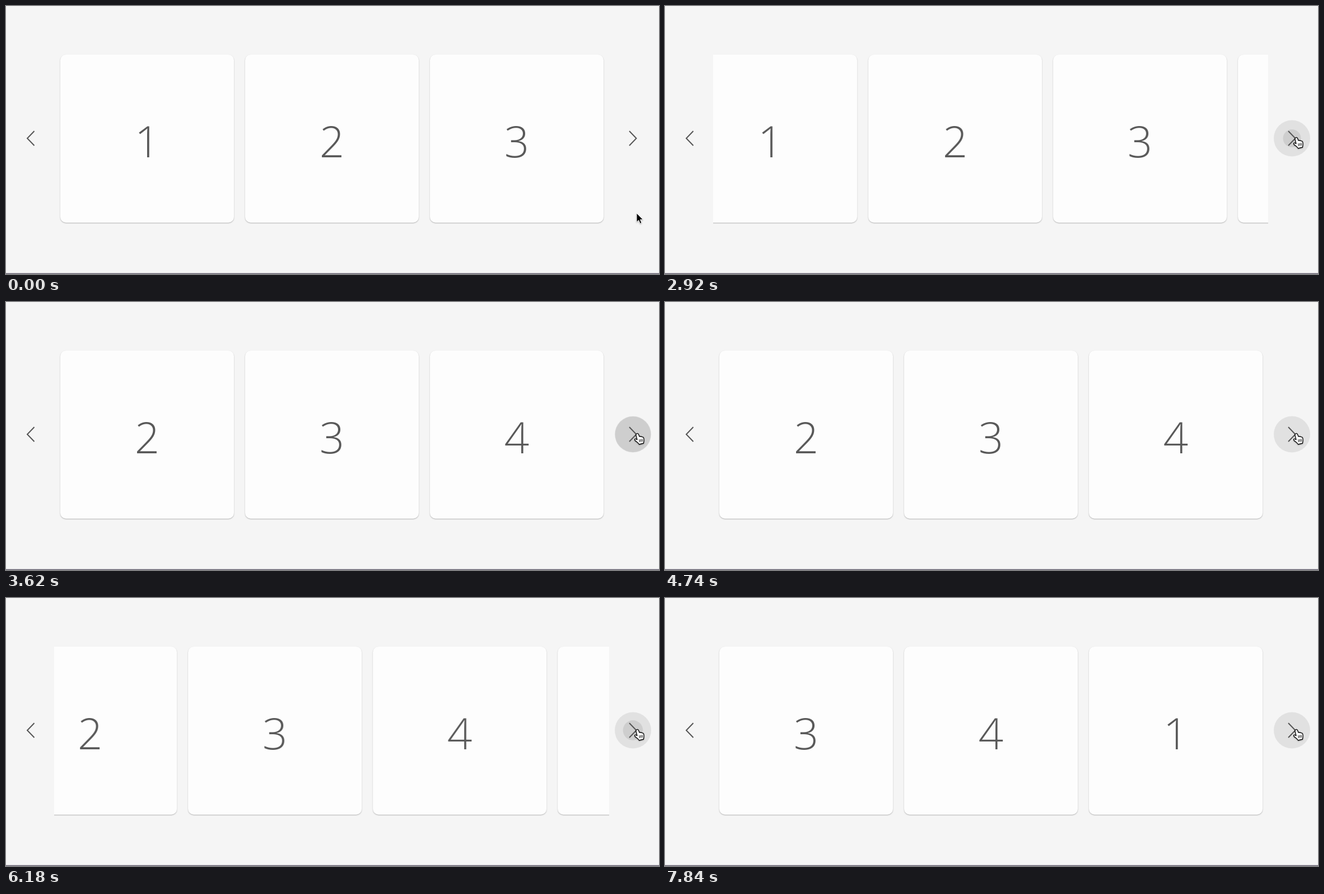
An HTML page for the animation above (8000 ms loop, 1166 by 480 pixels).

```html
<!DOCTYPE html>
<html lang="en">
<head>
<meta charset="utf-8">
<title>Card carousel</title>
<style>
  html, body { margin: 0; width: 100%; height: 100%; overflow: hidden; background: #f5f5f5; }
  #stage { position: relative; width: 1166px; height: 480px; overflow: hidden; }
  #viewport { position: absolute; left: 86px; top: 60px; width: 991px; height: 360px; overflow: hidden; }
  #track { position: absolute; left: 10.5px; top: 26.5px; display: flex; gap: 20px; will-change: transform; }
  .card {
    flex: none; width: 310px; height: 301px; border-radius: 10px; background: #fdfdfd;
    box-shadow: 0 1px 2px rgba(0, 0, 0, .28);
    font: 300 78px/308px "Open Sans", "Noto Sans", sans-serif;
    color: #595959; text-align: center;
  }
  svg { position: absolute; inset: 0; }
</style>
</head>
<body>
<div id="stage">
  <div id="viewport"><div id="track"></div></div>
  <svg width="1166" height="480" fill="none">
    <circle id="hover" cx="1119.5" cy="237" r="32.5" fill="#000"/>
    <circle id="ripple" cx="1119.5" cy="237" fill="#000"/>
    <path d="M50.5 224 38 237l12.500 13M1113 224l12.500 13-12.500 13" stroke="#555" stroke-width="2"/>
    <path d="M0 479.300H1166" stroke="#686472" stroke-width="1.400"/>
    <g id="cursor" style="filter: drop-shadow(0 1px 1px rgba(0,0,0,.3))" stroke-linejoin="round">
      <path id="arrow" fill="#000" stroke="#fff"
        d="M0 0V16.200L3.700 12.700 6.300 18.700 9 17.500 6.500 11.700H11.500Z"/>
      <g id="hand" transform="translate(-5 -3)" stroke="#000" stroke-width="1.300" stroke-linecap="round">
        <path fill="#fff" d="M5 2C6.500.8 8 1.600 8.500 3L10 7C11 6.300 12 6.500 12.600 7.300 13.600 6.700 14.800 7 15.200 8
          16.600 7.600 17.400 8.400 17.700 9.800 18.300 12.500 18.200 15 17.400 19L9.600 21C8 18 4 16 2 13.700
          .8 12 2.200 10.400 4.200 11.600L6 12.600 4 4.600C3.800 3.400 4 2.600 5 2Z"/>
        <path stroke-width="1" d="M9.800 12.500l.9 4M12.300 12l.8 4M14.800 11.500l.6 4"/>
      </g>
    </g>
  </svg>
</div>
<script>
const LOOP = 8000;
const STEP = 330;
const SLIDE_MS = 848;
const CLICKS = [2725, 5945];
const BUTTON = { x: 1119.5, y: 237, r: 32.5 };

const $ = id => document.getElementById(id);
const progress = (t, start, duration) => Math.min(1, Math.max(0, (t - start) / duration));

// Cubic Bezier easing with end heights 0 and 1, solved by bisection.
function bezier(x1, x2) {
  return x => {
    if (x <= 0 || x >= 1) return Math.min(1, Math.max(0, x));
    let low = 0, high = 1;
    for (let i = 0; i < 24; i++) {
      const s = (low + high) / 2, r = 1 - s;
      if (3 * s * r * r * x1 + 3 * s * s * r * x2 + s ** 3 < x) low = s;
      else high = s;
    }
    return low * low * (3 - 2 * low);
  };
}
const standard = bezier(.4, .2);
const decelerate = bezier(0, .2);
const inOut = bezier(.42, .58);

for (const label of [1, 2, 3, 4, 1]) {
  const card = document.createElement("div");
  card.className = "card";
  card.textContent = label;
  $("track").append(card);
}

function drawCursor(t) {
  const p = inOut(progress(t, 0, 850)), q = 1 - p;
  const along = (from, via, to) => q * q * from + 2 * p * q * via + p * p * to;
  const x = along(1126, 1154, 1126), y = along(371, 315, 237);
  const over = Math.hypot(x - BUTTON.x, y - BUTTON.y) < BUTTON.r;
  $("cursor").setAttribute("transform", `translate(${x} ${y})`);
  $("arrow").style.display = over ? "none" : "";
  $("hand").style.display = over ? "" : "none";
}

function drawRipple(t) {
  const start = CLICKS.filter(click => click - 22 <= t).pop() ?? Infinity;
  const age = t - start + 22;
  const fade = progress(age, 0, 120) * (1 - progress(age, 1100, 550));
  $("ripple").setAttribute("r", BUTTON.r * decelerate(progress(age, 0, 1109)));
  $("ripple").setAttribute("opacity", .085 * fade);
}

function draw(now) {
  const t = now % LOOP;
  const slides = CLICKS.reduce((sum, start) => sum + standard(progress(t, start, SLIDE_MS)), 0);
  $("track").style.transform = `translateX(${-STEP * slides}px)`;
  $("hover").setAttribute("opacity", .08 * progress(t, 620, 800));
  drawRipple(t);
  drawCursor(t);
}

const origin = performance.now();
function tick() {
  draw(performance.now() - origin);
  requestAnimationFrame(tick);
}
tick();
</script>
</body>
</html>
```
